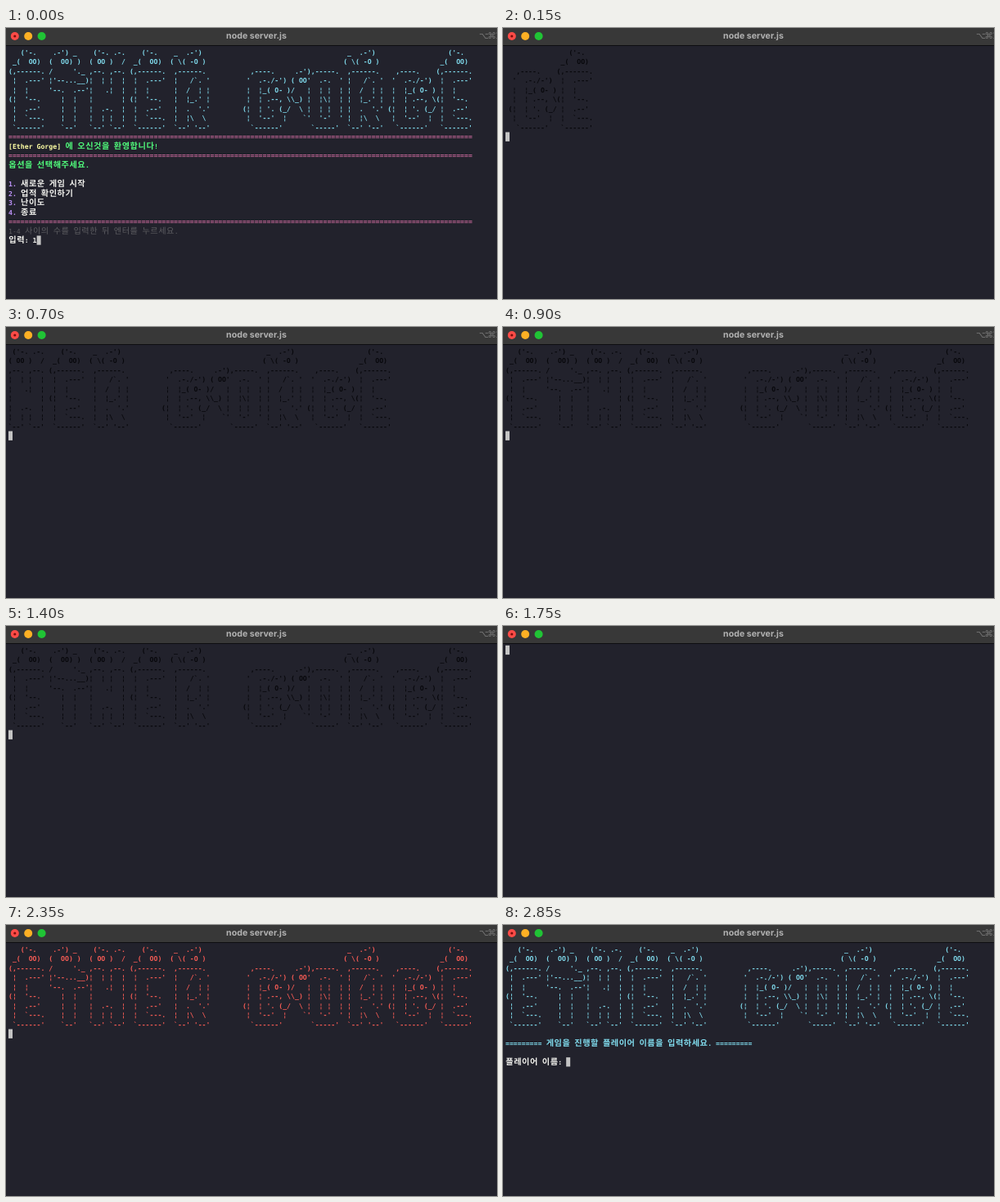
An HTML page that plays this animation: 600 by 332 pixels, repeating every 2900 ms.

```html
<!DOCTYPE html>
<html lang="ko">
<head>
<meta charset="utf-8">
<title>node server.js</title>
<style>
  html, body { margin: 0; width: 100%; height: 100%; overflow: hidden; background: #22222c; }
  #stage { display: block; width: 600px; height: 332px; }
  text { text-rendering: geometricPrecision; white-space: pre; }
  .mono { font-family: "DejaVu Sans Mono", monospace; font-size: 8.2px; }
  .hangul { font-family: "Noto Sans CJK KR", "Noto Sans CJK", sans-serif; font-size: 10.2px; text-anchor: middle; }
  .title { font: 700 10.6px Inter, sans-serif; text-anchor: middle; fill: #b2b2b2; }
  .keys { font: 10.5px "DejaVu Sans", sans-serif; fill: #777; }
</style>
</head>
<body>
<svg id="stage" viewBox="0 0 600 332">
  <rect width="600" height="332" fill="#22222c"/>
  <svg x="3" y="0" width="597" height="332"><g id="art"></g></svg>
  <g id="menu"></g>
  <g id="prompt"></g>
  <rect id="cursor" width="5" height="11.3" fill="#c4c4c4"/>
  <rect width="600" height="21" fill="#383838"/>
  <rect y="21" width="600" height="1" fill="#0d0d10"/>
  <circle cx="10.8" cy="10" r="5" fill="#fe4b47"/>
  <circle cx="10.8" cy="10" r="1.6" fill="#7a0d0b"/>
  <circle cx="27.2" cy="10" r="5" fill="#fdb024"/>
  <circle cx="43.6" cy="10" r="5" fill="#20c435"/>
  <text class="title" x="306" y="13.3">node server.js</text>
  <text class="keys" x="578" y="12.5">⌥</text>
  <text class="keys" x="588.5" y="12.5">⌘</text>
  <text class="keys" x="598" y="12.5">1</text>
</svg>

<!-- Each letter: name and width, then nine rows -->
<script type="text/plain" id="letters">
E 10
   ('-.
 _(  OO)
(,------.
 |  .---'
 |  |
(|  '--.
 |  .--'
 |  `---.
 `------'
T 10
 .-') _
(  OO) )
/     '._
|'--...__)
'--.  .--'
   |  |
   |  |
   |  |
   `--'
H 10
 ('-. .-.
( OO )  /
,--. ,--.
|  | |  |
|   .|  |
|       |
|  .-.  |
|  | |  |
`--' `--'
R 11
 _  .-')
( \( -O )
 ,------.
 |   /`. '
 |  /  | |
 |  |_.' |
 |  .  '.'
 |  |\  \
 `--' '--'
G 12


  ,----.
 '  .-./-')
 |  |_( O- )
 |  | .--, \
(|  | '. (_/
 |  '--'  |
  `------'
O 13


 .-'),-----.
( OO'  .-.  '
/   |  | |  |
\_) |  |\|  |
  \ |  | |  |
   `'  '-'  '
     `-----'
</script>
<script>
const LOOP = 2900, STEP = 50;
const CELL = 4.945, LINE = 11.53, LEFT = 3, TOP = 23.8, BASE = 8.8;
const C = {
  cyan: "#80dcee", red: "#f75c55", black: "#08080c", pink: "#ff80bf", green: "#50fa7b",
  yellow: "#ffffa5", purple: "#bd93f9", white: "#f0f0ec", gray: "#5c5c60"
};
const $ = id => document.getElementById(id);
const art = $("art"), menu = $("menu"), prompt_ = $("prompt"), cursor = $("cursor");

function addText(parent, cls, x, row, str, color, weight) {
  const el = document.createElementNS("http://www.w3.org/2000/svg", "text");
  el.setAttribute("class", cls);
  el.setAttribute("x", x);
  el.setAttribute("y", TOP + row * LINE + BASE);
  if (color) el.setAttribute("fill", color);
  el.setAttribute("font-weight", weight);
  el.textContent = str.replace(/ /g, "\u00a0");
  parent.append(el);
}

// Writes on the terminal grid; Hangul takes two cells. Returns the next column.
function put(parent, row, col, str, color, weight = 700) {
  for (const run of str.match(/[가-힣]+|[^가-힣]+/g)) {
    const wide = /[가-힣]/.test(run);
    const x = LEFT + col * CELL;
    if (wide) {
      const centers = [...run].map((_, i) => x + (2 * i + 1) * CELL);
      addText(parent, "hangul", centers.join(" "), row, run, color, weight);
    } else {
      addText(parent, "mono", x, row, run, color, weight);
    }
    col += run.length * (wide ? 2 : 1);
  }
  return col;
}

function buildArt() {
  const lines = $("letters").textContent.slice(1).split("\n");
  const glyphs = { " ": Array(9).fill(" ".repeat(7)) };
  for (let i = 0; i + 9 < lines.length; i += 10) {
    const [name, width] = lines[i].split(" ");
    glyphs[name] = lines.slice(i + 1, i + 10).map(s => s.padEnd(+width));
  }
  for (let row = 0; row < 9; row++) {
    const str = [..."ETHER GORGE"].map(ch => glyphs[ch][row]).join("");
    addText(art, "mono", 0, row, str.replace(/\|/g, "¦"), null, 700);
  }
}

function buildMenu() {
  for (const row of [9, 11, 18]) put(menu, row, 0, "=".repeat(115), C.pink, 400);
  const col = put(menu, 10, 0, "[Ether Gorge]", C.yellow);
  put(menu, 10, col, " 에 오신것을 환영합니다!", C.green);
  put(menu, 12, 0, "옵션을 선택해주세요.", C.green);
  ["새로운 게임 시작", "업적 확인하기", "난이도", "종료"].forEach((label, i) => {
    put(menu, 14 + i, 0, i + 1 + ".", C.purple);
    put(menu, 14 + i, 3, label, C.white);
  });
  put(menu, 19, 0, "1-4 사이의 수를 입력한 뒤 엔터를 누르세요.", C.gray, 400);
  put(menu, 20, 0, "입력: 1", C.white);
}

function buildPrompt() {
  const bar = "=".repeat(9);
  put(prompt_, 10, 0, `${bar} 게임을 진행할 플레이어 이름을 입력하세요. ${bar}`, C.cyan);
  put(prompt_, 12, 0, "플레이어 이름: ", C.white);
}

// Start time, art colour, cursor row and column, extra text
const scenes = [
  { at: 0, color: C.cyan, row: 20, col: 7, extra: menu },
  { at: 50, color: C.black, row: 9, col: 0 },
  { at: 1700, color: "none", row: 0, col: 0 },
  { at: 1800, color: C.red, row: 9, col: 0 },
  { at: 2700, color: C.cyan, row: 12, col: 15, extra: prompt_ }
];

function draw(t) {
  const scene = scenes.filter(s => s.at <= t).pop();
  // The dark title slides in from the left, about 0.13 columns per ms
  const hidden = scene.color === C.black ? Math.max(0, Math.round(113 - t * 40 / 300)) : 0;
  art.setAttribute("fill", scene.color);
  art.setAttribute("transform", `translate(${-hidden * CELL} 0)`);
  for (const g of [menu, prompt_]) g.style.display = g === scene.extra ? "" : "none";
  cursor.setAttribute("x", LEFT + scene.col * CELL);
  cursor.setAttribute("y", TOP + scene.row * LINE);
}

buildArt();
buildMenu();
buildPrompt();
const start = performance.now();
function tick() {
  const t = (performance.now() - start) % LOOP;
  draw(Math.floor(t / STEP) * STEP);
  requestAnimationFrame(tick);
}
tick();
</script>
</body>
</html>
```
